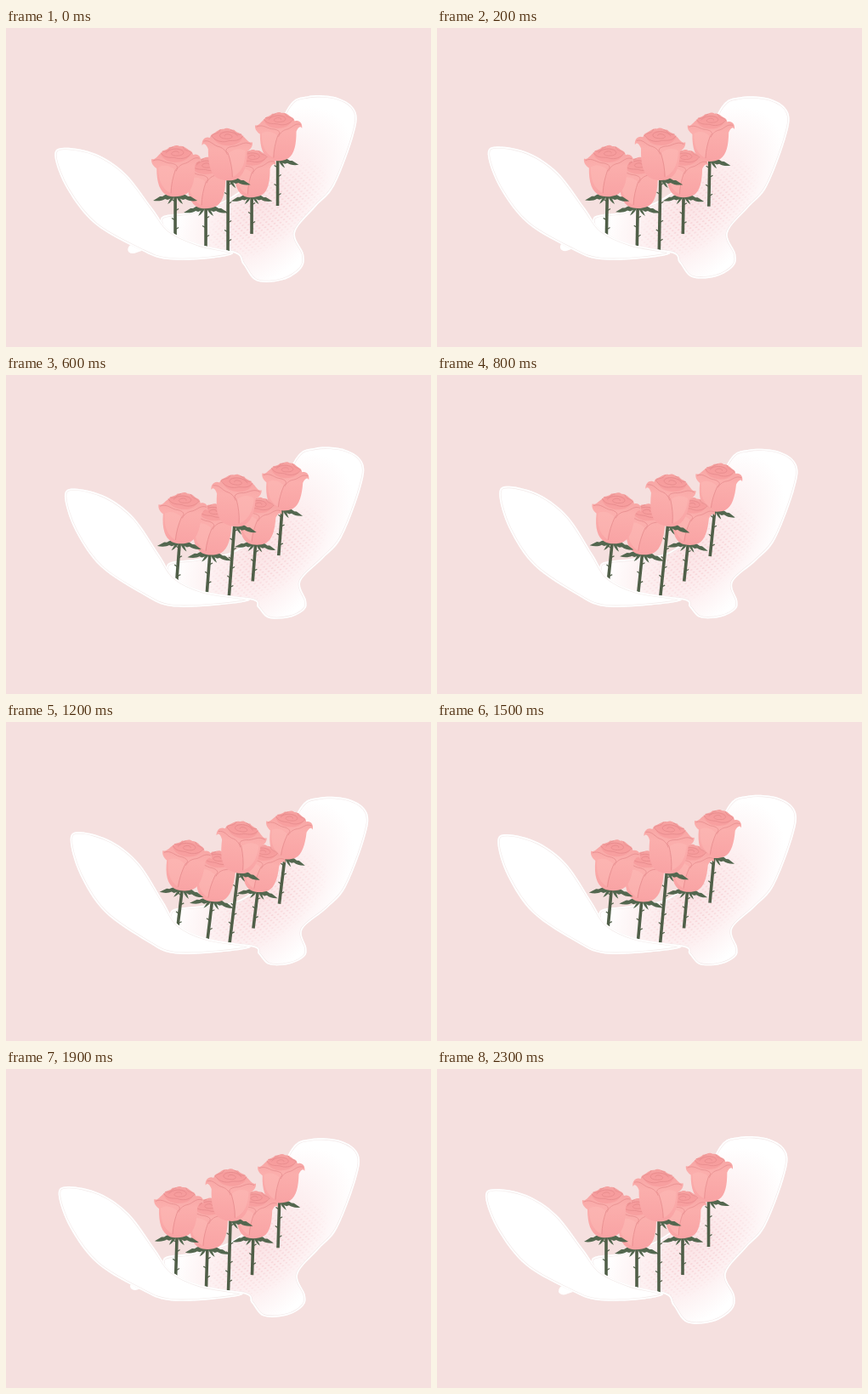
Recreate the animation shown at these times as an HTML page. Size 500 by 375 pixels, loop 2.4 s.

```html
<!DOCTYPE html>
<html lang="en">
<head>
<meta charset="utf-8">
<title>Rose pad</title>
<style>
html, body { margin: 0; width: 100%; height: 100%; overflow: hidden; background: #f5e0df; }
svg { display: block; width: 100%; height: 100%; }
</style>
</head>
<body>
<svg viewBox="0 0 500 375" xmlns="http://www.w3.org/2000/svg">
  <defs>
    <path id="padShape"/>
    <path id="wingShape"/>
    <clipPath id="padClip"><use href="#padShape"/></clipPath>
    <clipPath id="wingClip"><use href="#wingShape"/></clipPath>
    <radialGradient id="blush" gradientUnits="userSpaceOnUse" cx="0" cy="0" r="1"
      gradientTransform="translate(302 205) rotate(-48) scale(135 78)">
      <stop offset="0" stop-color="#fbe4e6"/>
      <stop offset=".55" stop-color="#fdf0f1"/>
      <stop offset="1" stop-color="#fff"/>
    </radialGradient>
    <radialGradient id="fade" gradientUnits="userSpaceOnUse" cx="0" cy="0" r="1"
      gradientTransform="translate(305 215) rotate(-36) scale(88 42)">
      <stop offset=".4" stop-color="#fff"/>
      <stop offset="1" stop-color="#000"/>
    </radialGradient>
    <mask id="dotMask" maskUnits="userSpaceOnUse" x="0" y="0" width="500" height="375">
      <rect width="500" height="375" fill="url(#fade)"/>
    </mask>
    <pattern id="dots" width="7" height="6" patternUnits="userSpaceOnUse" patternTransform="rotate(-8) skewX(-20)">
      <g fill="#f7d2d6">
        <ellipse cx="1.8" cy="1.5" rx="1.3" ry=".8"/>
        <ellipse cx="5.3" cy="4.5" rx="1.3" ry=".8"/>
      </g>
    </pattern>
    <linearGradient id="petal" x1="0" y1="0" x2="0" y2="1">
      <stop offset="0" stop-color="#f5a1a0"/>
      <stop offset=".4" stop-color="#fbaeac"/>
      <stop offset="1" stop-color="#f9a3a4"/>
    </linearGradient>
    <path id="leaf" fill="#53674f" d="M-2-1C5-3 11-1 15 2L18 2 26 7C20 8 15 7 12 5L9 6C4 4 0 2-2-1ZM0 0L6 5 9 11C5 9 2 5 0 0Z"/>
    <g id="bloom">
      <path fill="url(#petal)" d="M-9 1C-18-3-22-14-22-31-25-33-29-37-28-42-24-40-21-46-17-49-15-53-10-52-7-56-2-56 0-60 5-57 10-58 13-54 17-52 20-51 20-49 21-47 26-49 31-45 30-38 28-42 25-39 23-34 23-19 21-6 13-1 6 3-4 3-9 1Z"/>
      <path fill="#fdbcb9" opacity=".45" d="M-20-32C-13-36-6-34 0-29-4-19-5-9-6-2-17-8-20-19-20-32Z"/>
      <path fill="#f39192" opacity=".45" d="M-17-48C-8-56 9-57 18-49 16-42 9-38 0-38-9-38-15-42-17-48Z"/>
      <g fill="none" stroke="#e08486" stroke-width=".8" stroke-linecap="round" opacity=".75">
        <path d="M-26-40C-18-44-13-37-5-37 1-36 5-33 0-29-3-20-5-11-5-2"/>
        <path d="M28-43C21-45 18-39 12-37 7-36 3-33 1-28"/>
        <path d="M-17-49C-12-41-3-45 1-43 8-41 16-44 19-49"/>
        <path d="M-11-49C-7-55 4-55 8-52 12-49 8-46 3-46-3-45-7-48-3-50 0-52 5-51 4-49"/>
        <path d="M-15-51C-9-49-8-55-3-56M9-56C11-51 16-53 19-49"/>
      </g>
    </g>
  </defs>
  <rect width="500" height="375" fill="#f5e0df"/>
  <path id="tab" fill="#fff" d="M136 246L147 254Q141 260 144 263.5Q148 267 154 264L166 260L160 246Z"/>
  <g clip-path="url(#padClip)">
    <use href="#padShape" fill="url(#blush)"/>
    <g mask="url(#dotMask)"><use href="#padShape" fill="url(#dots)"/></g>
    <use href="#padShape" fill="none" stroke="#f2e8e8" stroke-width="4.6"/>
    <use href="#padShape" fill="none" stroke="#fff" stroke-width="3.4"/>
  </g>
  <g id="roses"></g>
  <g clip-path="url(#wingClip)">
    <use href="#wingShape" fill="#fff"/>
    <use href="#wingShape" fill="none" stroke="#f2e9e8" stroke-width="4.6"/>
    <use href="#wingShape" fill="none" stroke="#fff" stroke-width="3.4"/>
  </g>
</svg>
<script>
const PERIOD = 2400, STEP = 100, TILT = 7;
const $ = id => document.getElementById(id);
const clamp = v => Math.min(1, Math.max(0, v));

// Key points of the open pose; sway() derives every other pose.
const pad = [
  [266,264], [278,278], [294,298], [325,297], [347,283], [350,266], [340,240],
  [364,210], [386,185], [408,128], [411,98], [390,82], [355,80], [331,94],
  [300,165], [262,200], [218,216], [182,224], [205,256]
];
const wing = [
  [57,151], [68,141], [105,148], [140,171], [172,212], [192,238], [226,254],
  [266,264], [240,271], [190,272], [158,261], [105,231], [72,190]
];

// Back to front.
const roses = [
  { x: 319.5, y: 209, height: 55, size: .95 },
  { x: 289, y: 242, height: 45, size: .93, leaves: 2 },
  { x: 235, y: 258, height: 48, size: 1, leaves: 2 },
  { x: 199, y: 249, height: 53, size: 1, leaves: 2 },
  { x: 261, y: 263, height: 86, size: 1.02, flip: true }
];

function make(tag, attrs, parent) {
  const el = document.createElementNS('http://www.w3.org/2000/svg', tag);
  for (const key in attrs) el.setAttribute(key, attrs[key]);
  return parent.appendChild(el);
}

// Each rose stands on its own origin, so it only needs moving and tilting.
function plant({ height, size, leaves, flip }) {
  const rose = make('g', {}, $('roses'));
  let thorns = '';
  for (let y = 12, side = 1; y < height - 6; y += 11, side = -side) thorns += `M0 ${-y}l${side * 4} -2.5`;
  const green = { fill: 'none', stroke: '#505f48' };
  make('path', { ...green, d: `M0 0V${-height}`, 'stroke-width': 3.6 }, rose);
  make('path', { ...green, d: thorns, 'stroke-width': 1.2 }, rose);
  const head = make('g', { transform: `translate(0 ${-height}) scale(${size})` }, rose);
  make('use', { href: '#leaf' }, head);
  if (leaves === 2) make('use', { href: '#leaf', transform: 'scale(-1 1)' }, head);
  make('use', { href: '#bloom', transform: `scale(${flip ? -1 : 1} 1)` }, head);
  return rose;
}
roses.forEach(rose => rose.el = plant(rose));

// The left wing turns about a low pivot, the right wing slides, the front flap shrinks early.
function sway([x, y], p) {
  if (x < 260) return [x + .1 * (341 - y) * p, y + .1 * Math.min(0, x - 187) * p];
  const lift = clamp((250 - y) / 25);
  const flap = (1 - lift) * (1 - (1 - p) ** 3);
  return [
    x + 14 * p * lift + .22 * (365 - x) * flap,
    y + 9 * p * lift - .38 * Math.max(0, y - 264) * flap
  ];
}

// Closed Catmull-Rom curve.
function smooth(points) {
  const n = points.length, at = i => points[(i + n) % n];
  let d = 'M' + points[0];
  for (let i = 0; i < n; i++) {
    const a = at(i - 1), b = at(i), c = at(i + 1), e = at(i + 2);
    const out = b.map((v, k) => v + (c[k] - a[k]) / 6);
    const into = c.map((v, k) => v - (e[k] - b[k]) / 6);
    d += `C${out} ${into} ${c}`;
  }
  return d + 'Z';
}

function render(time) {
  const step = Math.floor(time % PERIOD / STEP) + 1;
  const p = (1 - Math.cos(2 * Math.PI * step * STEP / PERIOD)) / 2;
  $('padShape').setAttribute('d', smooth(pad.map(q => sway(q, p))));
  $('wingShape').setAttribute('d', smooth(wing.map(q => sway(q, p))));
  $('tab').setAttribute('transform', `translate(${12 * p} ${-22 * p})`);
  for (const { x, y, el } of roses) {
    const drop = .13 * (246 - y) * p;
    el.setAttribute('transform', `translate(${x + 2 * p} ${y + drop}) rotate(${TILT * p})`);
  }
}

function tick() {
  render(performance.now());
  requestAnimationFrame(tick);
}
tick();
</script>
</body>
</html>
```
